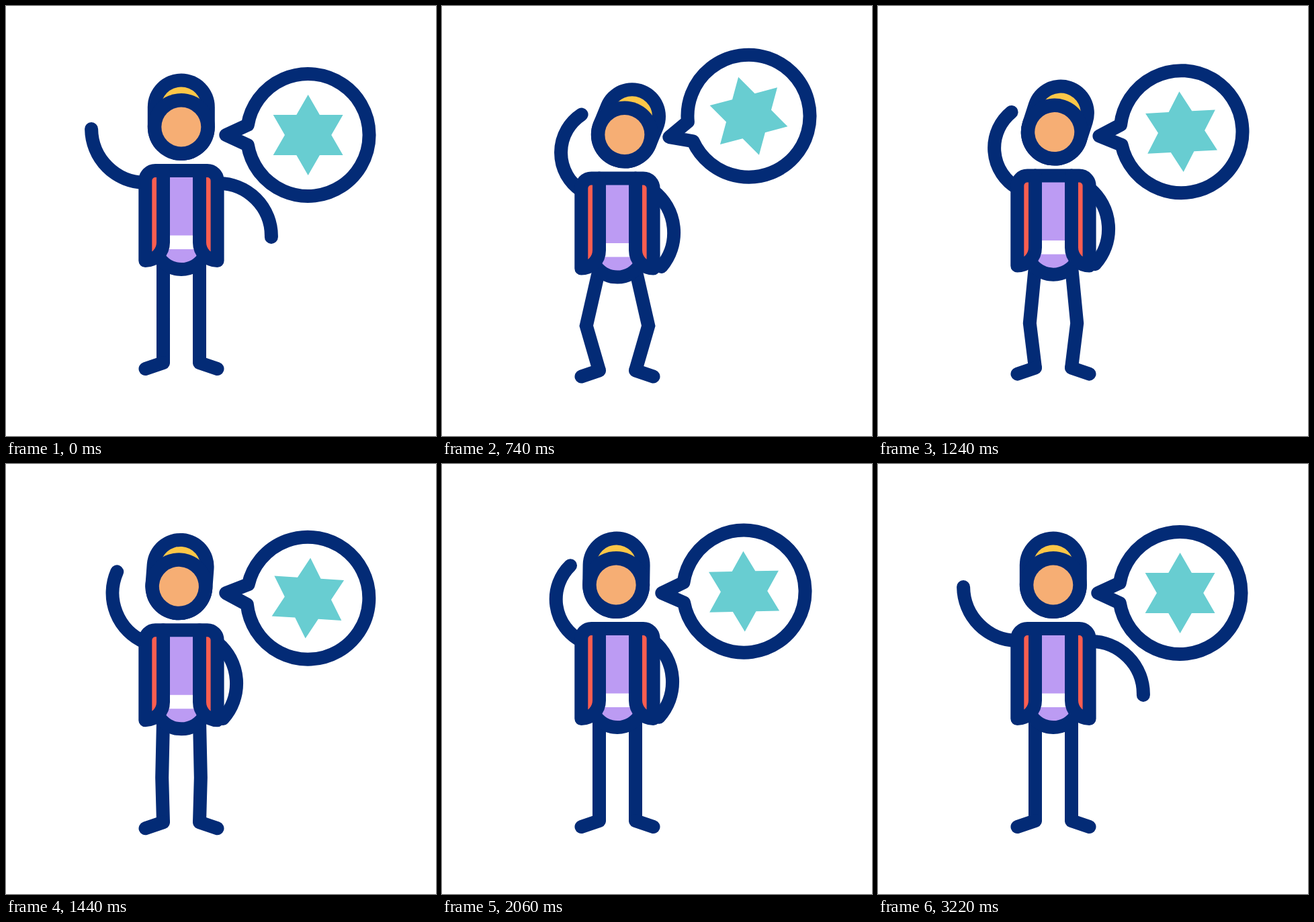
An HTML page that plays this animation: 640 by 640 pixels, repeating every 3600 ms.

```html
<!DOCTYPE html>
<html lang="en">
<head>
<meta charset="utf-8">
<title>Waving figure</title>
<style>
html, body { margin: 0; width: 100%; height: 100%; overflow: hidden; background: #fff; }
svg { display: block; width: 100%; height: 100%; }
.line { stroke: #032b76; stroke-width: 20; fill: none; }
.round { stroke-linecap: round; stroke-linejoin: round; }
.navy { fill: #032b76; }
.red { fill: #fe5e50; }
.white { fill: #fff; }
</style>
</head>
<body>
<svg viewBox="0 0 640 640">
  <g id="body">
    <path id="legs" class="line"/>
    <path class="line round" d="M234 531L207.5 540M288 531L314.5 540"/>
    <path id="arms" class="line round"/>
    <path fill="#bc9bf3" d="M230 245H292V377A40 40 0 0 1 230 377Z"/>
    <path class="white" d="M230 341.5H292V362H230Z"/>
    <path class="line" d="M226 371.4A40 40 0 0 0 296 371.4"/>
    <path class="line round" d="M234 245H288"/>
    <path class="line round red" d="M234 245V352A27 27 0 0 1 207.3 379V260A15 15 0 0 1 222.3 245Z"/>
    <path class="line round red" d="M288 245V352A27 27 0 0 0 314.6 379V260A15 15 0 0 0 299.6 245Z"/>
    <g id="head">
      <rect class="navy" x="-50" y="-79.5" width="100" height="129.5" rx="50"/>
      <circle cy="-29.5" r="30" fill="#fdc748"/>
      <circle class="navy" r="50"/>
      <circle r="29.5" fill="#f6ae74"/>
    </g>
  </g>
  <g id="bubble">
    <path class="line round white" d="M0 0L32.5 -15A91 91 0 1 1 32.5 15Z"/>
    <path id="star" fill="#68cdd1"/>
  </g>
</svg>
<script>
const LOOP = 3600;
const set = (id, name, value) => document.getElementById(id).setAttribute(name, value);

// Arc from shoulder to hand; side is -1 for the raised arm, 1 for the lowered one
function arm(x, y, side, angle, bend) {
  const chord = 113, a = angle * Math.PI / 180;
  const r = (chord * chord / 4 + bend * bend) / (2 * bend);
  return `M${x} ${y}A${r} ${r} 0 0 1 ${x + side * chord * Math.sin(a)} ${y + side * chord * Math.cos(a)}`;
}

function draw(t) {
  const ease = (from, to) => {
    const u = Math.min(1, Math.max(0, (t - from) / (to - from)));
    return (1 - Math.cos(Math.PI * u)) / 2;
  };
  const pulse = (from, peak, to) => ease(from, peak) - ease(peak, to);

  // Crouch and stand up again
  const knee = 19.5 * pulse(0, 800, 1600);
  set('body', 'transform', `translate(0 ${13 * pulse(100, 920, 1640)})`);
  set('legs', 'd', `M234 380L${234 - knee} 464.5L234 531M288 380L${288 + knee} 464.5L288 531`);

  // Both arms swing in and back out; the raised one waves once in between
  const wave = 35 * ease(1060, 1660) - 24 * ease(1680, 2080);
  const left = 45 - 48 * ease(80, 860) + wave + 37 * ease(2080, 3220);
  const right = 45 - 41 * (ease(0, 860) - ease(2080, 3220));
  const bend = 23 + 0.16 * (45 - left) - 7 * pulse(1250, 1660, 2070);
  set('arms', 'd', arm(207, 263, -1, left, bend) + arm(315, 264, 1, right, 24));

  // Head leans right, overshoots to the left and settles
  const headX = 11.2 * ease(0, 800) - 16.5 * ease(800, 1620) + 5.3 * ease(1660, 2300);
  const headTilt = 23.5 * ease(60, 860) - 29 * ease(1060, 1690)
    + 8.5 * ease(1690, 2250) - 3 * ease(2250, 2900);
  set('head', 'transform', `translate(${260.8 + headX} 180) rotate(${headTilt})`);

  // Bubble swings up about its tip, drops back and rebounds
  const x = 327.3 + 11 * (ease(0, 640) - ease(850, 1400));
  const y = 192 + 4 * pulse(400, 900, 1500);
  const tilt = -21 * ease(0, 590) + 7.5 * ease(590, 800) + 18.5 * ease(850, 1570)
    - 8.5 * ease(1640, 1900) + 3.5 * ease(1900, 2160);
  set('bubble', 'transform', `translate(${x} ${y}) rotate(${tilt})`);
}

const points = Array.from({ length: 12 }, (_, i) => {
  const r = i % 2 ? 60 / Math.sqrt(3) : 60, a = i * Math.PI / 6;
  return `${122.3 + r * Math.sin(a)} ${-r * Math.cos(a)}`;
});
set('star', 'd', `M${points.join('L')}Z`);

const start = performance.now();
function tick() {
  draw((performance.now() - start) % LOOP);
  requestAnimationFrame(tick);
}
tick();
</script>
</body>
</html>
```
